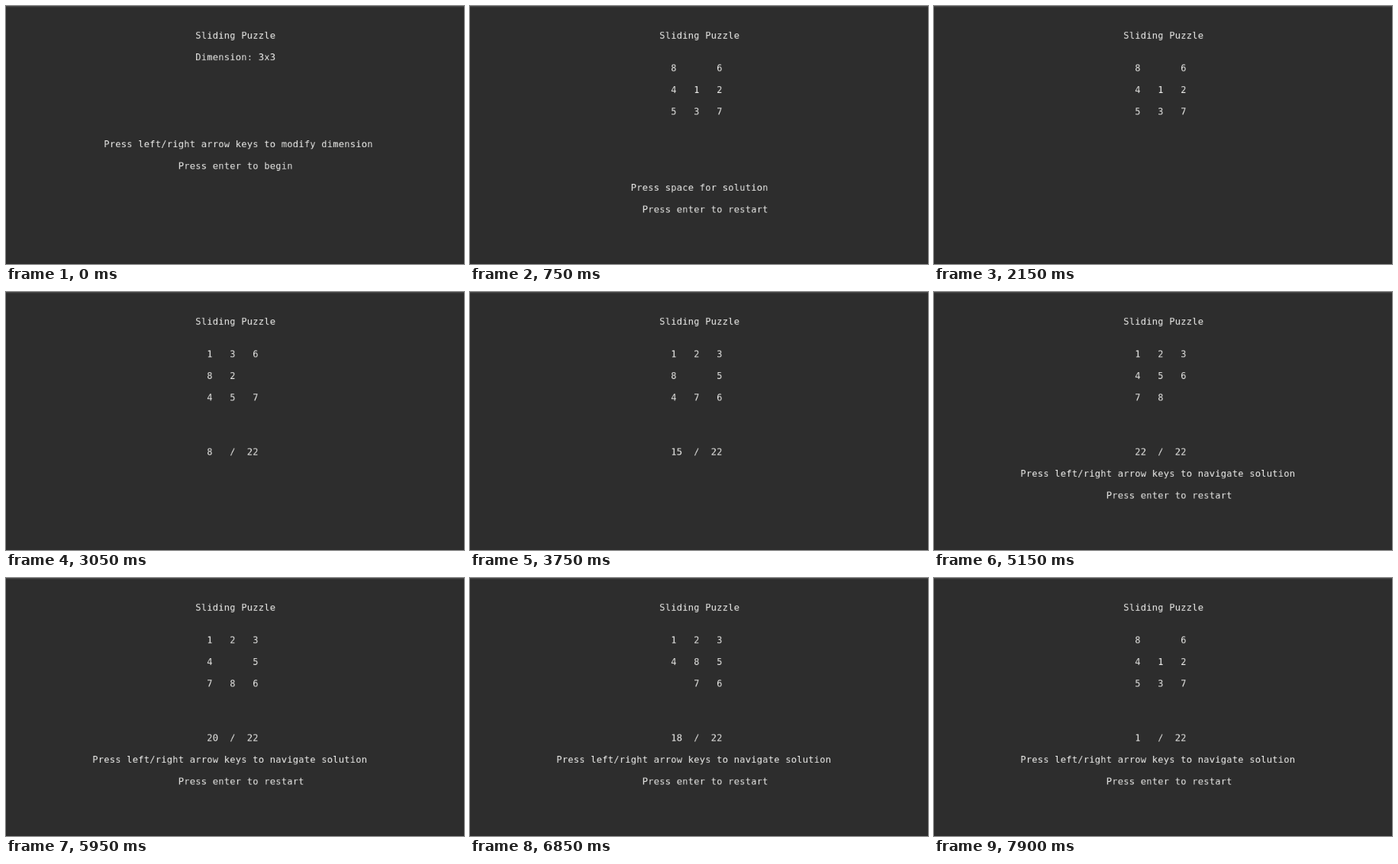
Write an HTML page with a canvas that moves like this. It is 600x338 px and loops after 8 s.

```html
<!DOCTYPE html>
<html lang="en">
<head>
<meta charset="utf-8">
<title>Sliding Puzzle</title>
<style>
html, body { margin: 0; width: 100%; height: 100%; overflow: hidden; background: #2d2d2d; }
canvas { display: block; width: 100%; height: 100%; }
</style>
</head>
<body>
<canvas width="800" height="451"></canvas>
<script>
const LOOP = 8000, TICK = 50;

// Terminal grid: 10 x 19 cells on an 800 px wide window, shown scaled to the page.
const CELL_W = 10, CELL_H = 19, LEFT = 1, BASE = 19;
const { width, height } = document.querySelector('canvas');
const ctx = document.querySelector('canvas').getContext('2d', { alpha: false });
ctx.font = '16px "DejaVu Sans Mono", monospace';

// Tiles pushed into the gap, in order, from the shuffled board to the solved one.
const moves = [...'135481326325765847856'];
const boards = ['8 6412537'];
for (const tile of moves) {
  const last = boards[boards.length - 1];
  boards.push(last.replace(/[ \d]/g, c => c === ' ' ? tile : c === tile ? ' ' : c));
}
const TOTAL = boards.length;

const SHUFFLED = 50, SOLVE = 2146, STEP = 104, DONE = SOLVE + STEP * (TOTAL - 1);
const presses = [5300, 5750, 6200, 6600, 6950];
const HOLD = 7150, REPEAT = 36;

function put(col, row, str) {
  [...String(str)].forEach((c, i) =>
    ctx.fillText(c, LEFT + (col + i) * CELL_W, BASE + row * CELL_H));
}

function drawBoard(board) {
  [...board].forEach((c, i) => put(35 + 4 * (i % 3), 5 + 2 * Math.floor(i / 3), c));
}

function drawCounter(n) {
  put(35, 14, n);
  put(39, 14, '/');
  put(42, 14, TOTAL);
}

function drawHelp(col, str) {
  put(col, 16, str);
  put(30, 18, 'Press enter to restart');
}

function navStep(t) {
  const taps = presses.filter(p => t >= p).length;
  const held = t < HOLD ? 0 : Math.floor((t - HOLD) / REPEAT) + 1;
  return Math.max(1, TOTAL - taps - held);
}

function drawScreen(t) {
  put(33, 2, 'Sliding Puzzle');
  if (t < SHUFFLED) {
    put(33, 4, 'Dimension: 3x3');
    put(17, 12, 'Press left/right arrow keys to modify dimension');
    put(30, 14, 'Press enter to begin');
  } else if (t < SOLVE) {
    drawBoard(boards[0]);
    drawHelp(28, 'Press space for solution');
  } else if (t < DONE) {
    const n = Math.floor((t - SOLVE) / STEP);
    drawBoard(boards[n]);
    if (n) drawCounter(n);
  } else {
    const n = navStep(t);
    drawBoard(boards[n - 1]);
    drawCounter(n);
    drawHelp(15, 'Press left/right arrow keys to navigate solution');
  }
}

function render(ms) {
  const t = Math.floor((ms % LOOP) / TICK) * TICK;
  ctx.fillStyle = '#2d2d2d';
  ctx.fillRect(0, 0, width, height);
  ctx.fillStyle = '#474747';
  ctx.fillRect(0, 0, width, 1.75);
  ctx.fillStyle = '#eeeeec';
  drawScreen(t);
}

let start;
function frame(now) {
  start ??= now;
  render(now - start);
  requestAnimationFrame(frame);
}
render(0);
requestAnimationFrame(frame);
</script>
</body>
</html>
```
